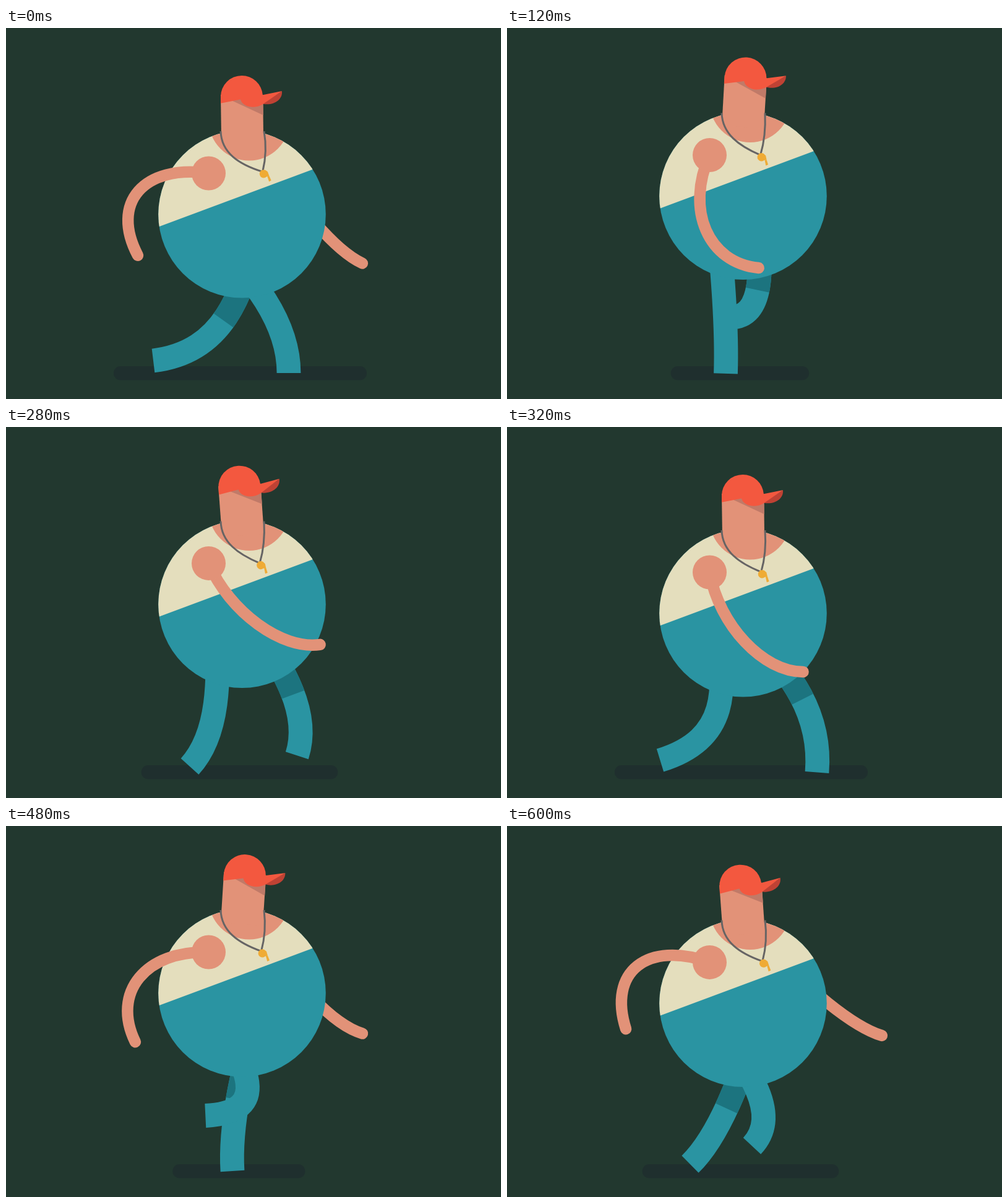
Animation, 800 px wide and 600 px high, one loop 0.64 s. Source, as an HTML page with a canvas:

```html
<!DOCTYPE html>
<html lang="en">
<head>
<meta charset="utf-8">
<title>Walking coach</title>
<style>
  html, body { margin: 0; width: 100%; height: 100%; overflow: hidden; background: #22382f; }
  canvas { display: block; width: 800px; height: 600px; }
</style>
</head>
<body>
<canvas id="stage" width="800" height="600"></canvas>
<script>
const ctx = document.getElementById('stage').getContext('2d');
const STEP = 40, COUNT = 16;
const SKIN = '#e29278', BLUE = '#2a94a2', DARK = '#1c747f', CREAM = '#e4debd';
const RED = '#f3583f', GOLD = '#efab35';

// Hip rides on the body; each key is a step, then knee and foot on the stage
const NEAR_LEG = {
  hip: [341, 343],
  keys: [
    [0, 457, 472, 457, 558], [3, 356, 483, 353.5, 558.8], [5, 350, 483, 344.3, 558],
    [7, 346, 495, 297, 549], [8, 362, 504, 247.5, 539], [10, 419, 473, 306.7, 483],
    [12, 434, 463, 322.3, 468.5], [15, 444, 466, 396, 517.5]
  ]
};
const FAR_LEG = {
  hip: [405, 341],
  keys: [
    [0, 354, 524, 238, 538], [3, 417, 470, 359, 468], [5, 421, 472, 367.5, 468.5],
    [8, 509, 460, 501, 558.5], [10, 390, 485, 394, 558], [12, 361, 480, 366, 558],
    [15, 344, 500, 296, 547]
  ]
};

// Cosine with the given number of waves per walk cycle, peaking at step `peak`
const wave = (k, peak, waves = 1) => Math.cos((k - peak) * waves * 2 * Math.PI / COUNT);
const mix = (a, b, u) => a.map((v, i) => v + (b[i] - v) * u);

const bodyLift = k => -31 * (1 - Math.abs((k % 8) / 4 - 1) ** 2.2);
const headTilt = k => 1.45 + 3.75 * wave(k, 2.8, 2) + 1.33 * wave(k, 0.62, 4);
const whistleX = k => 414.5 + 4.5 * Math.exp(-(((k - 4.5) / 4.8) ** 2)) * Math.cos(k * 2 * Math.PI / 5);

// Smooth cyclic interpolation through key poses
function pose(keys, k) {
  const n = keys.length;
  const at = i => keys[(i + n) % n];
  const time = i => at(i)[0] + Math.floor(i / n) * COUNT;
  let i = n - 1;
  while (keys[i][0] > k) i--;
  const span = time(i + 1) - time(i), u = (k - time(i)) / span;
  const u2 = u * u, u3 = u2 * u;
  const slope = (j, c) => (at(j + 1)[c] - at(j - 1)[c]) / (time(j + 1) - time(j - 1)) * span;
  return at(i).map((v, c) =>
    (2 * u3 - 3 * u2 + 1) * v + (u3 - 2 * u2 + u) * slope(i, c) +
    (3 * u2 - 2 * u3) * at(i + 1)[c] + (u3 - u2) * slope(i + 1, c)).slice(1);
}

// First part of a cubic curve, up to u
function head(p, u) {
  const [a, b, c, d] = p;
  const ab = mix(a, b, u), bc = mix(b, c, u), cd = mix(c, d, u);
  const abc = mix(ab, bc, u), bcd = mix(bc, cd, u);
  return [a, ab, abc, mix(abc, bcd, u)];
}

function leg(rig, k) {
  const [kx, ky, fx, fy] = pose(rig.keys, k);
  const hip = [rig.hip[0], rig.hip[1] + bodyLift(k)], knee = [kx, ky];
  return [hip, mix(hip, knee, 0.47), knee, [fx, fy]];
}

// An arm of fixed length: the closer the hand, the deeper the bow
function arm(x, y, k, swing, lean, bend) {
  const angle = (lean + swing * (wave(k, 6.04) + 0.023 * wave(k, 3.2, 3))) * Math.PI / 180;
  const reach = 198 + 25 * wave(k, 6.9);
  const bow = bend * Math.sqrt(236 ** 2 - reach ** 2);
  const s = Math.sin(angle), c = Math.cos(angle);
  const at = (along, out) => [x + s * along - c * out, y + c * along + s * out];
  return [[x, y], at(reach * 0.33, bow), at(reach * 0.8, bow), at(reach, 0)];
}

function disc(x, y, r, color) {
  ctx.fillStyle = color;
  ctx.beginPath();
  ctx.arc(x, y, r, 0, Math.PI * 2);
  ctx.fill();
}

function poly(color, ...pts) {
  ctx.fillStyle = color;
  ctx.beginPath();
  for (let i = 0; i < pts.length; i += 2) ctx.lineTo(pts[i], pts[i + 1]);
  ctx.closePath();
  ctx.fill();
}

function hose([a, b, c, d], width, color, cap = 'butt') {
  ctx.strokeStyle = color;
  ctx.lineWidth = width;
  ctx.lineCap = cap;
  ctx.beginPath();
  ctx.moveTo(...a);
  ctx.bezierCurveTo(...b, ...c, ...d);
  ctx.stroke();
}

function drawShadow(lift) {
  const half = 204.5 + 3.145 * lift, mid = 378.5 + 0.07 * lift;
  ctx.fillStyle = '#1f2f2e';
  ctx.beginPath();
  ctx.roundRect(mid - half, 547, half * 2, 22.5, 11);
  ctx.fill();
}

function drawBody() {
  ctx.save();
  ctx.beginPath();
  ctx.arc(381.5, 301.3, 135.3, 0, Math.PI * 2);
  ctx.clip();
  ctx.fillStyle = BLUE;
  ctx.fillRect(240, 160, 290, 290);
  poly(CREAM, 240, 324, 523, 218.6, 523, 150, 240, 150);
  disc(393, 149, 65.5, SKIN);
  ctx.restore();
}

function drawHead(tilt) {
  ctx.save();
  ctx.translate(382.3, 174);
  ctx.rotate(tilt * Math.PI / 180);
  ctx.translate(-382.3, -174);
  poly(SKIN, 347, 108, 415.2, 108, 416.2, 190, 348.2, 190);
  poly('#c07a68', 362, 116, 415.4, 108, 415.8, 141);

  // Underside of the peak
  ctx.fillStyle = '#bf4234';
  ctx.beginPath();
  ctx.moveTo(446, 102);
  ctx.bezierCurveTo(447.5, 116, 432, 126.5, 414, 122.5);
  ctx.closePath();
  ctx.fill();

  ctx.fillStyle = RED;
  ctx.beginPath();
  ctx.moveTo(347, 121.8);
  ctx.lineTo(347, 111);
  ctx.arc(381, 111, 34, Math.PI, -0.08);
  ctx.lineTo(446, 102);
  ctx.lineTo(415, 123.2);
  ctx.bezierCurveTo(402, 131.5, 382, 128, 379, 115.5);
  ctx.closePath();
  ctx.fill();
  ctx.restore();
}

function drawWhistle(x) {
  const y = 235.5 + (417 - x) * 0.5, side = 421.5 + (x - 417) * 0.6;
  hose([[347, 167], [348, 201], [375, 220], [x - 2, y - 3.5]], 3, '#666464');
  hose([[417, 167], [side, 190], [side - 1, 210], [x - 1.5, y - 4]], 3, '#666464');
  ctx.save();
  ctx.translate(x, y);
  ctx.rotate((417 - x) * 0.025);
  disc(0, 0, 6.6, GOLD);
  poly(GOLD, 2, -6, 6.5, -3.5, 9, 3, 5, 4.5);
  poly(GOLD, 6, 4, 9, 3, 12.5, 10.5, 9, 12.5);
  ctx.restore();
}

function draw(k) {
  const lift = bodyLift(k);
  ctx.fillStyle = '#22382f';
  ctx.fillRect(0, 0, 800, 600);
  drawShadow(lift);

  ctx.save();
  ctx.translate(0, lift);
  hose(arm(432, 214, k + 8.15, 50, 6, 0.23), 18.5, SKIN, 'round');
  ctx.restore();

  const far = leg(FAR_LEG, k);
  hose(far, 38.8, BLUE);
  hose(head(far, 0.53), 38.8, DARK);
  hose(leg(NEAR_LEG, k), 38.8, BLUE);

  ctx.save();
  ctx.translate(0, lift);
  drawBody();
  drawHead(headTilt(k));
  drawWhistle(whistleX(k));
  hose(arm(327.5, 235, k, 57, 1.2, 0.565), 18.5, SKIN, 'round');
  disc(327.5, 235, 27.5, SKIN);
  ctx.restore();
}

const start = performance.now();
function tick() {
  draw(Math.floor((performance.now() - start) / STEP) % COUNT);
  requestAnimationFrame(tick);
}
tick();
</script>
</body>
</html>
```
